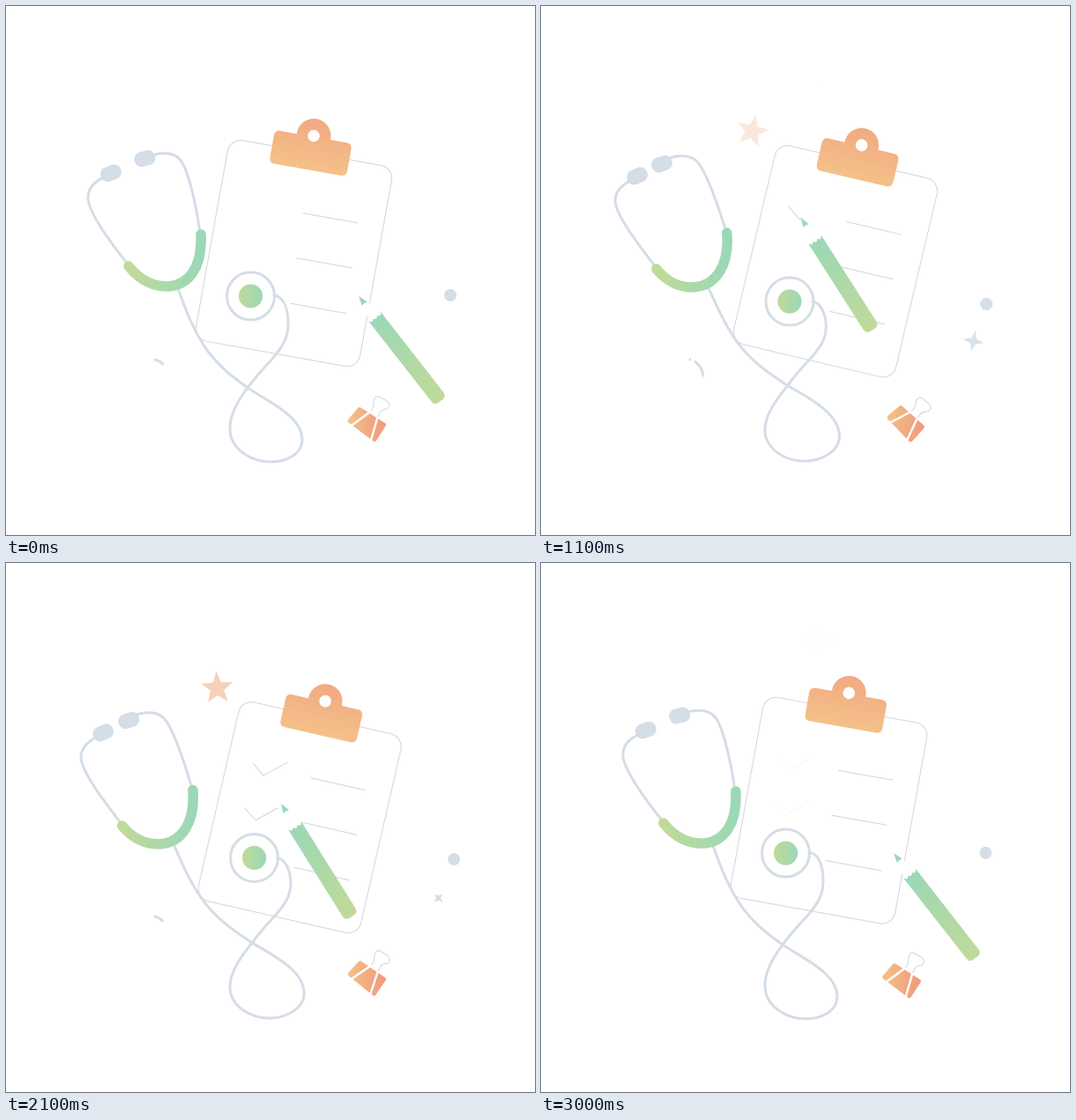
Animation of 600 by 600 pixels, one loop 3.1 s. Source, as an HTML page:

```html
<!DOCTYPE html>
<html lang="en">
<head>
<meta charset="utf-8">
<title>Medical checklist</title>
<style>
  html, body { margin: 0; width: 100%; height: 100%; overflow: hidden; background: #fff; }
  svg { display: block; width: 100vw; height: 100vh; }
  .thin { fill: none; stroke: #d2d4d8; stroke-width: 1; stroke-linecap: round; stroke-linejoin: round; }
  .tube { fill: none; stroke: #d5dde7; stroke-width: 3; stroke-linecap: round; }
  .grey { fill: #d5dde7; }
</style>
</head>
<body>
<svg viewBox="0 0 600 600">
  <defs>
    <linearGradient id="green"><stop stop-color="#c1da99"/><stop offset="1" stop-color="#9ad8b6"/></linearGradient>
    <linearGradient id="greenBack"><stop stop-color="#9ad8b6"/><stop offset="1" stop-color="#c1da99"/></linearGradient>
    <linearGradient id="orange" gradientUnits="userSpaceOnUse" x1="0" y1="-40" x2="0" y2="19">
      <stop stop-color="#f2a982"/><stop offset="1" stop-color="#f4c189"/>
    </linearGradient>
    <linearGradient id="peach"><stop stop-color="#f3bf86"/><stop offset="1" stop-color="#f09b7e"/></linearGradient>
  </defs>

  <path id="swirl" class="tube" pathLength="126"
    d="M169 401C175 402 183 409 184 420C185 430 182 436 177 438C170 443 165 440 165 435C167 428 178 424 188 424C200 425 212 432 217 443"/>
  <circle id="dot" class="grey" r="7"/>
  <path id="sparkA" class="grey"/>
  <path id="sparkB" class="grey"/>
  <path id="star" fill="#f1b28b"/>

  <g id="board">
    <rect class="thin" x="232" y="164.8" width="189" height="231.5" rx="15" transform="rotate(10.2 326.6 280.5)"/>
    <path class="thin" d="M337 235L399 246M330 286L392 297M323 337.3L386 348.7"/>
    <path id="checkA" class="thin" pathLength="1" d="M270.5 221.5L283 235L309 219"/>
    <path id="checkB" class="thin" pathLength="1" d="M263.5 272.7L276.5 286L302.7 270"/>
    <g transform="translate(345.5 167) rotate(10)">
      <path fill="url(#orange)" d="M-38 -19H-19.5V-20A19.5 19.5 0 0 1 19.5 -20V-19H38Q44.5 -19 44.5 -12.5V12.5Q44.5 19 38 19H-38Q-44.5 19 -44.5 12.5V-12.5Q-44.5 -19 -38 -19Z"/>
      <circle cy="-20" r="6.8" fill="#fff"/>
    </g>
  </g>

  <g id="binder">
    <path class="thin" d="M412 461Q418 456 417 449Q417 442 423 443L432 448Q437 452 432 457Q426 457 424 461L421 468"/>
    <path fill="url(#peach)" stroke="url(#peach)" stroke-width="5" stroke-linejoin="round" d="M401 457.5L428.500 475L418 491.500L390 470.500Z"/>
    <path fill="none" stroke="#fff" stroke-width="2.4" d="M414 459.500L389 478M421.500 466L413 496"/>
  </g>

  <path id="tube" class="tube"/>
  <path id="earTubeL" class="tube"/>
  <path id="earTubeR" class="tube"/>
  <path id="arc" fill="none" stroke="url(#green)" stroke-width="11.5" stroke-linecap="round"/>
  <rect id="earL" class="grey" x="-12" y="-8.5" width="24" height="17" rx="8"/>
  <rect id="earR" class="grey" x="-12" y="-8.5" width="24" height="17" rx="8"/>
  <g id="chest">
    <circle class="tube" r="27"/>
    <circle r="13.6" fill="url(#green)"/>
  </g>

  <g id="pencil">
    <path fill="#fff" d="M10 -3.300L32 -8.700V8.700L10 3.300Z"/>
    <path fill="#9ad8b6" d="M0 0L11 -3.700Q9.500 0 11 3.700Z"/>
    <path fill="url(#greenBack)" d="M29 -8.700Q35 -5.800 30 -2.900Q35 0 30 2.900Q35 5.800 29 8.700H145Q151 8.700 151 3V-3Q151 -8.700 145 -8.700Z"/>
  </g>
</svg>
<script>
const LOOP = 3100, STEP = 100;
const el = {};
document.querySelectorAll('svg [id]').forEach(n => { el[n.id] = n; });
const set = (id, name, value) => el[id].setAttribute(name, value);

const smooth = u => u * u * (3 - 2 * u);
const clamp = u => Math.min(1, Math.max(0, u));

// Value at time t along [time, value] keys
function track(t, keys, ease = u => u) {
  if (t <= keys[0][0]) return keys[0][1];
  for (let i = 1; i < keys.length; i++) {
    const [t0, a] = keys[i - 1], [t1, b] = keys[i];
    if (t <= t1) return a + (b - a) * ease((t - t0) / (t1 - t0));
  }
  return keys[keys.length - 1][1];
}

// Blends two strings holding the same sequence of numbers
function mix([a, b], k) {
  const to = b.match(/-?[\d.]+/g);
  let i = 0;
  return a.replace(/-?[\d.]+/g, n => (+n + (to[i++] - n) * k).toFixed(2));
}

function starPath(points, r, inner) {
  let d = '';
  for (let i = 0; i < points * 2; i++) {
    const a = i * Math.PI / points, q = i % 2 ? r * inner : r;
    d += (i ? 'L' : 'M') + (q * Math.sin(a)).toFixed(2) + ' ' + (-q * Math.cos(a)).toFixed(2);
  }
  return d + 'Z';
}

// Two poses of each flexible part
const poses = {
  tube: [
    'M195 320C203 343 213 370 230 393C243 410 256 420 274 433C300 450 336 466 336 492C336 508 318 517 301 517C278 517 254 503 254 479C254 462 264 446 274 433C285 418 294 409 303 399C314 386 320 376 320 361C320 345 316 330 304 328',
    'M189 320C198 339 207 359 219 376C236 400 256 414 281 430C308 445 339 462 339 487C339 505 317 516 298 516C276 516 254 502 254 481C254 464 268 446 281 430C291 416 299 408 308 398C318 386 324 378 324 364C324 352 318 338 309 337'],
  earTubeL: [
    'M112 194C100 199 93 207 93 218C94 234 115 264 139 294',
    'M99 199C88 205 82 212 82 222C84 240 108 270 129 298'],
  earTubeR: [
    'M166 169C178 166 193 165 200 178C210 196 218 240 220 258',
    'M142 173C153 169 168 169 176 181C190 203 202 240 208 256'],
  arc: [
    'M139 295C152 312 170 319 185 318C207 316 223 297 221 259',
    'M129 299C142 315 158 320 172 319C196 317 212 294 208.500 257']
};
const placed = {
  earL: ['translate(119 189.500) rotate(-20)', 'translate(107 193.500) rotate(-24)'],
  earR: ['translate(157.500 173) rotate(-14)', 'translate(132.500 180.500) rotate(-20)'],
  chest: ['translate(277.500 329)', 'translate(283 336.500)'],
  board: ['rotate(0 161 423)', 'rotate(3.8 161 423)']
};

const pencil = {
  x: [[0, 400], [650, 279], [900, 279], [1050, 293], [1400, 324], [1700, 270], [1850, 283], [2100, 312], [2800, 400]],
  y: [[0, 329], [600, 227], [900, 227], [1050, 241], [1350, 229], [1400, 233], [1700, 278], [1850, 292], [2100, 273], [2900, 329]],
  a: [[0, 52], [500, 54.7], [900, 54], [1400, 63.6], [1700, 55], [2100, 58], [2500, 58.2], [2900, 52]]
};
const binder = {
  x: [[0, 0], [500, 3], [900, 5], [1400, 3], [2100, 0], [2500, -1], [3100, 0]],
  y: [[0, 0], [500, 2.5], [900, 0], [1400, -2], [2100, -3.5], [2500, -4.5], [3100, 0]],
  a: [[0, 0], [500, 5], [900, 10], [1400, 8], [2100, 2], [2500, 1], [3100, 0]]
};
const dot = {
  x: [[0, 504], [500, 503], [900, 504], [1400, 507], [2100, 508], [2500, 506], [3100, 504]],
  y: [[0, 328], [500, 332.5], [900, 337], [1350, 339.5], [2100, 336], [2500, 333], [3100, 328]]
};

function check(id, t, start, corner, end) {
  const p = track(t, [[start, 0], [corner, .38], [end, 1]], smooth);
  set(id, 'stroke-dasharray', p + ' 2');
  set(id, 'opacity', p ? track(t, [[2650, 1], [3100, 0]]) : 0);
}

// Grows, turns and fades twice per loop
function spark(id, x, y, t, start, gap) {
  const age = t - start < gap ? t - start : t - start - gap;
  const alive = age > 0 && age < 720;
  const turn = 118 * (1 - clamp(age / 650)) ** 2;
  set(id, 'd', alive ? starPath(4, age * .027, .36) : '');
  set(id, 'opacity', track(age, [[400, 1], [720, 0]]));
  set(id, 'transform', `translate(${x} ${y}) rotate(${turn})`);
}

function star(t) {
  const age = t < 1350 ? t - 235 : t - 1350;
  set('star', 'd', age > 0 && age < 1000 ? starPath(5, Math.min(19, age * .027), .42) : '');
  set('star', 'opacity', track(age, [[600, 1], [980, 0]]));
  set('star', 'transform', `translate(239.5 142) rotate(${track(t, [[500, 20], [900, 17], [2100, -3]])})`);
}

function swirl(t) {
  const age = t % 1050;
  const tail = track(age, [[0, 0], [350, 46], [400, 56], [500, 73], [750, 126]]);
  const head = track(age, [[0, 10], [350, 115], [400, 119], [500, 126]]);
  set('swirl', 'stroke-dasharray', `0 ${tail} ${head - tail} 300`);
  set('swirl', 'visibility', head - tail > .5 ? 'visible' : 'hidden');
}

function draw(t) {
  const half = LOOP / 2;
  const k = smooth(1 - Math.abs(t - half) / half) / .975;
  for (const id in poses) set(id, 'd', mix(poses[id], k));
  for (const id in placed) set(id, 'transform', mix(placed[id], k));

  const at = (part, ease) => Object.values(part).map(keys => track(t, keys, ease));
  const [px, py, pa] = at(pencil, smooth);
  set('pencil', 'transform', `translate(${px} ${py}) rotate(${pa})`);
  const [bx, by, ba] = at(binder);
  set('binder', 'transform', `translate(${bx} ${by}) rotate(${ba} 409 474.5)`);
  const [dx, dy] = at(dot);
  set('dot', 'transform', `translate(${dx} ${dy})`);

  check('checkA', t, 900, 1050, 1350);
  check('checkB', t, 1700, 1850, 2140);
  spark('sparkA', 313.5, 87.5, t, 1080, 1210);
  spark('sparkB', 490.5, 380, t, 650, 1200);
  star(t);
  swirl(t);
}

const begin = performance.now();
function frame() {
  const t = (performance.now() - begin) % LOOP;
  draw(Math.floor(t / STEP) * STEP);
  requestAnimationFrame(frame);
}
frame();
</script>
</body>
</html>
```
